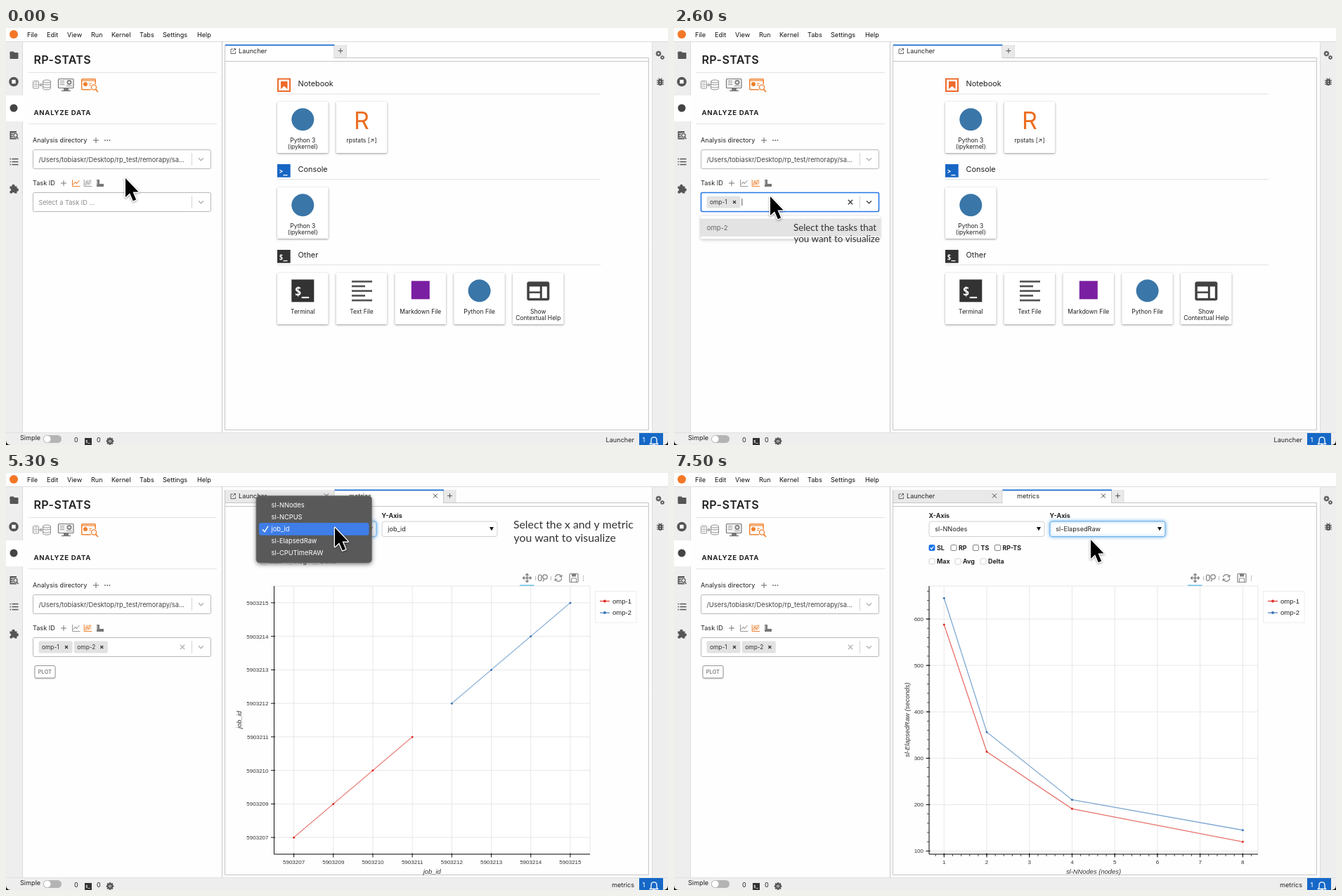
An HTML page with a canvas that plays this animation: 942x594 px, repeating every 7600 ms.

```html
<!DOCTYPE html>
<html lang="en">
<head>
<meta charset="utf-8">
<title>Task metrics walkthrough</title>
<style>
html, body { margin: 0; width: 100%; height: 100%; overflow: hidden; background: #fff; }
canvas { display: block; width: 942px; height: 594px; }
</style>
</head>
<body>
<canvas id="stage"></canvas>
<script>
const W = 942, H = 594, LOOP = 7600, STEP = 100;
const canvas = document.getElementById('stage');
const c = canvas.getContext('2d');
const dpr = window.devicePixelRatio || 1;
canvas.width = W * dpr;
canvas.height = H * dpr;

const UI = 'Inter, sans-serif', PLOT = '"Liberation Sans", Arial, sans-serif', NOTE = 'Lato, sans-serif';
const INK = '#222', DARK = '#555', ORANGE = '#f0812f', BLUE = '#1f6fd0', LINE = '#dcdcdc', BAR = '#eeeeee';
const RED = '#dd2c22', STEEL = '#3a75b5';

// drawing helpers
function text(s, x, y, size = 9.15, color = INK, opt = {}) {
  c.font = `${opt.style || ''} ${opt.weight || 400} ${size}px ${opt.font || UI}`;
  c.textAlign = opt.align || 'left';
  c.letterSpacing = (opt.space || 0) + 'px';
  c.fillStyle = color;
  c.fillText(s, x, y);
}
function rect(x, y, w, h, color) { c.fillStyle = color; c.fillRect(x, y, w, h); }
function box(x, y, w, h, r, fill, stroke, lw = 1) {
  c.beginPath();
  c.roundRect(x, y, w, h, r);
  if (fill) { c.fillStyle = fill; c.fill(); }
  if (stroke) { c.strokeStyle = stroke; c.lineWidth = lw; c.stroke(); }
}
function trace(pts) {
  c.beginPath();
  for (let i = 0; i < pts.length; i += 2) c.lineTo(pts[i], pts[i + 1]);
}
function line(pts, color, lw = 1) { trace(pts); c.strokeStyle = color; c.lineWidth = lw; c.stroke(); }
function poly(pts, color) { trace(pts); c.fillStyle = color; c.fill(); }
function disc(x, y, r, fill) { c.beginPath(); c.arc(x, y, r, 0, 7); c.fillStyle = fill; c.fill(); }
function ring(x, y, r, color, lw = 1) { c.beginPath(); c.arc(x, y, r, 0, 7); c.strokeStyle = color; c.lineWidth = lw; c.stroke(); }
function plus(x, y, r, color, lw = 1) { line([x - r, y, x + r, y], color, lw); line([x, y - r, x, y + r], color, lw); }
function cross(x, y, r, color, lw = 1) {
  line([x - r, y - r, x + r, y + r], color, lw);
  line([x - r, y + r, x + r, y - r], color, lw);
}
function chevron(x, y, color) { line([x - 3.5, y - 1.8, x, y + 1.8, x + 3.5, y - 1.8], color, 1.3); }
function shaded(draw, blur, color, dy = 1) {
  c.save();
  c.shadowBlur = blur * dpr;
  c.shadowColor = color;
  c.shadowOffsetY = dy * dpr;
  draw();
  c.restore();
}

// timeline
const AT = { multi: 1600, open1: 1900, pick1: 2200, open2: 2500, pick2: 2900, plot: 3800, openX: 4700, pickX: 5600, openY: 5900, pickY: 6500 };
const PATH = [
  [0, 170, 214], [300, 170, 214], [800, 115, 222], [1600, 115, 222], [1900, 137, 242],
  [1950, 137, 242], [2150, 130, 283], [2250, 130, 283], [2450, 137, 240], [2700, 137, 240],
  [2850, 130, 283], [2950, 130, 283], [3300, 52, 279], [3850, 52, 279], [4600, 468, 78],
  [5300, 468, 78], [5450, 468, 46], [5600, 468, 46], [5850, 590, 79], [6100, 590, 79],
  [6350, 593, 95], [LOOP, 593, 95]
];
function pointer(t) {
  let i = 1;
  while (PATH[i][0] < t) i++;
  const [t0, x0, y0] = PATH[i - 1], [t1, x1, y1] = PATH[i];
  const u = (t - t0) / (t1 - t0), e = u * u * (3 - 2 * u);
  return { x: x0 + (x1 - x0) * e, y: y0 + (y1 - y0) * e };
}
const over = (p, x, y, w, h) => p.x >= x && p.x <= x + w && p.y >= y && p.y <= y + h;
const during = (t, a, b) => t >= a && t < b;

// small icons
function chartIcon(x, y, color, twin, s = 1) {
  c.save();
  c.translate(x, y);
  c.scale(s, s);
  line([-5, -5, -5, 4.5, 6, 4.5], color, 1);
  line([-4, 2, -1, -1.5, 1, 0.5, 5, -4], color, 1.1);
  if (twin) line([-3, -1, -1, -4, 1, -2.5, 4, -5], color, 0.9);
  if (twin) line([-3, 3, 0, 1, 2, 2, 5.5, -1], color, 0.9);
  c.restore();
}
function terminal(x, y, size, color, sign) {
  rect(x, y, size, size, color);
  text(sign, x + size * 0.13, y + size * 0.74, size * 0.54, '#fff', { weight: 600, font: '"Noto Sans Mono", monospace' });
}
function launchMark(x, y) {
  line([x, y - 3, x - 3, y - 3, x - 3, y + 3.5, x + 3.5, y + 3.5, x + 3.5, y + 0.5], DARK, 0.9);
  line([x - 0.5, y + 0.5, x + 3.5, y - 3.5], DARK, 0.9);
  line([x + 1, y - 3.5, x + 3.5, y - 3.5, x + 3.5, y - 1], DARK, 0.9);
}
function gear(x, y, r, hole) {
  c.save();
  c.translate(x, y);
  for (let i = 0; i < 4; i++) { rect(-r * 1.3, -r * 0.3, r * 2.6, r * 0.6, DARK); c.rotate(Math.PI / 4); }
  disc(0, 0, r, DARK);
  disc(0, 0, r * 0.45, hole);
  c.restore();
}
function bell(x, y) {
  c.beginPath();
  c.moveTo(x - 5.5, y + 4);
  c.lineTo(x - 4, y + 2);
  c.lineTo(x - 4, y - 1.5);
  c.bezierCurveTo(x - 4, y - 7, x + 4, y - 7, x + 4, y - 1.5);
  c.lineTo(x + 4, y + 2);
  c.lineTo(x + 5.5, y + 4);
  c.closePath();
  c.strokeStyle = '#fff';
  c.lineWidth = 1.3;
  c.stroke();
  disc(x, y + 6, 1.4, '#fff');
}

function frameBars(t) {
  rect(0, 0, W, H, '#fefefe');
  rect(0, 19, 24, 558, BAR);
  rect(919, 19, 23, 558, BAR);
  rect(0, 96, 24, 37, '#fff');
  line([0, 19.5, W, 19.5], LINE);
  line([23.5, 19, 23.5, 96], LINE);
  line([23.5, 133, 23.5, 576], LINE);
  line([919.5, 19, 919.5, 576], LINE);
  line([307.5, 19, 307.5, 576], '#c8c8c8');
  disc(11, 9, 6, '#f37726');
  [['File', 30], ['Edit', 58], ['View', 87], ['Run', 121], ['Kernel', 150], ['Tabs', 190], ['Settings', 223], ['Help', 272]]
    .forEach(([s, x]) => text(s, x, 12.7, 9.15, '#111'));

  // left rail
  box(5.5, 35, 12, 9, 1, DARK);
  box(5.5, 33.5, 6, 4, 1, DARK);
  disc(11, 76.5, 6.8, DARK);
  rect(8.3, 73.8, 5.4, 5.4, '#fff');
  disc(11, 114, 5.5, '#444');
  rect(5.5, 147, 9.5, 11.5, DARK);
  [150, 153, 156].forEach(y => line([7, y, 11, y], '#fff', 1));
  disc(13.5, 153, 4, BAR);
  ring(13.5, 153, 2.6, DARK, 1.2);
  line([15, 155, 17.5, 158], DARK, 1.4);
  [186.5, 190.5, 194.5].forEach(y => { rect(5.5, y - 0.7, 1.6, 1.5, DARK); rect(8.5, y - 0.7, 9, 1.5, DARK); });
  rect(5.5, 225.5, 10, 10, DARK);
  disc(10.5, 225, 2.2, DARK);
  disc(15.8, 230.5, 2.2, DARK);
  disc(5.5, 230.5, 1.7, BAR);
  disc(10.5, 235.7, 1.7, BAR);

  // right rail
  gear(928.5, 36.5, 3, BAR);
  gear(934, 42, 2.3, BAR);
  box(928, 72.5, 6, 9.5, 3, DARK);
  [74.5, 77.2, 80].forEach(y => line([926, y, 936, y], DARK, 1.2));
  line([928.5, 71, 930, 73], DARK);
  line([933.5, 71, 932, 73], DARK);
  line([930, 76, 932, 76], BAR);
  line([930, 79, 932, 79], BAR);

  // status bar
  rect(0, 576, W, 18, BAR);
  line([0, 576.5, W, 576.5], '#e0e0e0');
  text('Simple', 20, 586.7);
  box(53, 580, 26, 11, 5.5, '#b4b4b4');
  disc(58.7, 585.5, 4.8, '#fff');
  text('0', 97, 590);
  terminal(112, 584, 10, '#333', '$_');
  text('0', 129, 590);
  gear(148, 588.5, 4.1, BAR);
  disc(148, 588.5, 1, DARK);
  text(t < AT.plot ? 'Launcher' : 'metrics', 894, 590, 9.15, INK, { align: 'right' });
  rect(901, 577, 34, 17, '#1668c7');
  text('1', 905.5, 590, 9.5, '#fff');
  bell(922, 588.5);
}

function selectBox(y, focus, hot) {
  box(38.5, y + 0.5, 253, 27, 2, '#fff', focus ? '#2577e8' : '#b8b8b8', focus ? 1.6 : 1);
  line([264.5, y + 5, 264.5, y + 23], '#d4d4d4');
  chevron(277.5, y + 14, hot ? '#444' : '#b0b0b0');
}
function pill(s, x) {
  box(x, 239.5, 48, 17, 2, '#e2e2e2');
  text(s, x + 4.5, 251, 8.4, '#333');
  cross(x + 39.5, 248, 2, '#333', 1.1);
}

function sidePanel(t, p) {
  text('RP-STATS', 39.5, 51, 16.1, '#222', { weight: 600, space: 0.35 });
  line([32, 63.5, 300, 63.5], '#e2e2e2');
  line([32, 136.5, 300, 136.5], '#e2e2e2');
  text('ANALYZE DATA', 39.5, 123.7, 9.6, '#222', { weight: 700, space: 0.7 });

  // workflow icons
  const g = '#929292';
  box(38.5, 75.5, 8, 10.5, 1, null, g);
  [78, 80.5, 83].forEach(y => line([40, y, 45, y], g, 0.8));
  line([46, 81, 51, 81], g, 1.2);
  line([49, 79, 51, 81, 49, 83], g, 1.2);
  c.beginPath();
  c.ellipse(58, 76, 5.5, 2, 0, 0, 7);
  [80, 84, 87].forEach(y => { c.moveTo(63.5, y - 1); c.ellipse(58, y - 1, 5.5, 2, 0, 0, Math.PI); });
  c.moveTo(52.5, 76); c.lineTo(52.5, 86);
  c.moveTo(63.5, 76); c.lineTo(63.5, 86);
  c.strokeStyle = g;
  c.lineWidth = 1;
  c.stroke();
  box(74.5, 72.5, 21.5, 13, 1, '#f3f3f3', '#777', 1.2);
  [75.5, 78, 80.5].forEach(y => line([77, y, 83, y], g, 0.9));
  ring(90, 77.5, 2.6, '#777', 1.6);
  line([86, 82.5, 94, 82.5], g, 0.9);
  rect(82, 86, 7, 3, '#777');
  line([79, 89.5, 92, 89.5], '#777', 1.3);
  box(107.7, 72.7, 19.5, 15, 1, '#fff', ORANGE, 1.5);
  line([107, 75, 128, 75], ORANGE, 1.2);
  disc(113, 80, 3, ORANGE);
  [79, 81.5].forEach(y => line([118, y, 122, y], ORANGE));
  disc(125, 84.5, 5.3, '#fff');
  ring(125, 84.5, 3.6, ORANGE, 1.4);
  line([127.5, 87.3, 131, 91], ORANGE, 1.8);

  text('Analysis directory', 38, 163.2);
  plus(128, 160, 4, '#666');
  [141, 144.2, 147.4].forEach(x => disc(x, 160, 0.9, '#666'));
  selectBox(173, false, false);
  text('/Users/tobiaskr/Desktop/rp_test/remorapy/sa...', 46.5, 190.7, 9.35, '#444');

  // task row
  const multi = t >= AT.multi, hover = over(p, 109, 214, 14, 13);
  text('Task ID', 38, 224.3);
  plus(82, 221, 4, '#777');
  chartIcon(99.5, 221, multi ? '#999' : ORANGE, false);
  chartIcon(116.2, 221, multi || hover ? ORANGE : '#999', true);
  poly([129, 216, 133, 216, 133, 222, 139, 222, 139, 226, 129, 226], '#777');
  [218, 220, 222].forEach(y => line([129, y, 130.8, y], '#fff', 0.7));

  const menu = during(t, AT.open1, AT.pick1) || during(t, AT.open2, AT.pick2);
  const active = during(t, AT.open1, AT.plot);
  const tasks = (t >= AT.pick1) + (t >= AT.pick2);
  selectBox(234, menu, active);
  if (tasks > 0) {
    pill('omp-1', 46.5);
    if (tasks > 1) pill('omp-2', 96.8);
    cross(251, 248, 3.2, active ? '#444' : '#b8b8b8', 1.5);
  } else if (!active) text('Select a Task ID ...', 46.5, 251.5, 9.2, '#8c8c8c');
  if (active) line([46.5 + 50.3 * tasks, 243, 46.5 + 50.3 * tasks, 253], '#444', 0.9);
  if (tasks > 1) {
    const hot = over(p, 40, 273, 30, 20);
    shaded(() => box(41, 274.5, 29, 17.5, 2, '#fff'), 2, '#aaa');
    box(41, 274.5, 29, 17.5, 2, '#fff', hot ? '#f4a66c' : '#999', 1);
    text('PLOT', 55.5, 286, 7.4, hot ? ORANGE : '#555', { align: 'center', space: 0.2 });
  }
  if (menu) {
    const list = tasks ? ['omp-2'] : ['omp-1', 'omp-2'];
    const h = 7 + 25.5 * list.length;
    shaded(() => box(38, 268, 255, h, 2, '#fff'), 4, '#bbb');
    const row = Math.min(list.length - 1, Math.max(0, Math.floor((p.y - 271) / 25.5)));
    list.forEach((s, i) => {
      if (i === row) rect(38, 271.5, 255, 25.5, '#e3e3e3');
      text(s, 46.8, 288 + i * 25.5, 9.5, '#666');
    });
  }
}

function card(x, y, label, sub, draw) {
  shaded(() => box(x, y, 72.5, 73, 1.5, '#fff'), 3, '#999');
  draw(x + 36.3, y + 25.3);
  text(label, x + 36.3, y + 57.8, 8.5, INK, { align: 'center' });
  if (sub) text(sub, x + 36.3, y + 67.4, 8.5, INK, { align: 'center' });
}
const blueDot = (x, y) => disc(x, y, 16, '#3a76a8');

function launcher() {
  box(387, 72.5, 17, 17.5, 0, '#fff', '#ee6a2c', 2);
  poly([391, 76, 400.5, 76, 400.5, 87, 395.7, 82.8, 391, 87], '#ee6a2c');
  terminal(386, 194, 18.7, '#1766c4', '>_');
  terminal(386, 316, 18.7, '#333', '$_');
  ['Notebook', 'Console', 'Other'].forEach((s, i) => {
    text(s, 415.5, 83 + i * 122, 10.9);
    line([386, 94 + i * 121.7, 846, 94 + i * 121.7], '#e0e0e0');
  });
  card(386, 105, 'Python 3', '(ipykernel)', blueDot);
  card(469.7, 105, 'rpstats [↗]', '', (x, y) => text('R', x, y + 14, 34, '#ec6e22', { align: 'center' }));
  card(386, 227, 'Python 3', '(ipykernel)', blueDot);
  card(386, 349, 'Terminal', '', (x, y) => terminal(x - 16, y - 16, 32, '#333', '$_'));
  card(469.7, 349, 'Text File', '', (x, y) => {
    for (let i = 0; i < 5; i++) rect(x - 14, y - 14.5 + i * 6.7, i % 2 ? 19 : 29, 2.7, '#555');
  });
  card(553.5, 349, 'Markdown File', '', (x, y) => rect(x - 13, y - 14, 26, 26, '#7b1fa2'));
  card(637.3, 349, 'Python File', '', blueDot);
  card(721, 349, 'Show', 'Contextual Help', (x, y) => {
    box(x - 16, y - 13, 32, 27, 3, '#424242');
    rect(x - 12.5, y - 6, 15, 7, '#fff');
    rect(x - 12.5, y + 3.5, 15, 7, '#fff');
    rect(x + 5.5, y - 6, 7, 16.5, '#fff');
  });
}

function dock(t) {
  const plotted = t >= AT.plot;
  line([311.5, 24, 311.5, 572.5, 914.5, 572.5, 914.5, 42.5, 311.5, 42.5], '#c6c6c6');
  line([312, 47.5, 914, 47.5], '#c6c6c6');
  const tab = (x, w, on) => {
    rect(x, 24, w, 18, on ? '#fff' : '#e9e9e9');
    line([x + w - 0.5, 24, x + w - 0.5, 42], '#c9c9c9');
    if (on) { rect(x, 42, w - 1, 1, '#fff'); rect(x, 23.5, w, 1.8, BLUE); }
  };
  tab(312, 155.5, !plotted);
  launchMark(323, 33);
  text('Launcher', 331, 36.2, 9.1);
  let end = 467.5;
  if (plotted) {
    cross(456, 32.5, 3, '#444');
    tab(467.5, 155.5, true);
    text('metrics', 488, 36.2, 9.1);
    cross(611, 32.5, 3, '#444');
    end = 623;
  }
  rect(end, 24, 17, 18, '#e9e9e9');
  line([end + 17, 24, end + 17, 42], LINE);
  plus(end + 8.5, 32.5, 3.4, '#555');
}

function dropdown(x, label, value, focus) {
  text(label, x, 64.3, 9, INK, { weight: 700 });
  const draw = () => box(x + 0.5, 69, 164, 21.5, 3, '#fff', focus ? '#66afe9' : '#d0d0d0');
  if (focus) shaded(draw, 5, '#66afe9', 0); else draw();
  text(value, x + 8.7, 82.7);
  poly([x + 153.5, 77, x + 159.5, 77, x + 156.5, 82.3], '#111');
}
function check(x, y, label, on, faint) {
  box(x + 0.5, y - 4, 8, 8, 1.5, on ? '#1a73e8' : '#fff', on ? '#1a73e8' : faint ? '#ccc' : '#777', 0.9);
  if (on) line([x + 2.4, y, x + 4, y + 2, x + 6.8, y - 2], '#fff', 1.3);
  text(label, x + 11.5, y + 3.4, 8.9, INK, { weight: 700 });
}

const METRICS = ['sl-NNodes', 'sl-NCPUS', 'job_id', 'sl-ElapsedRaw', 'sl-CPUTimeRAW'];
function popup(x, p) {
  shaded(() => box(x, 32.5, 164.5, 95.5, 5, 'rgba(88,88,88,.97)'), 6, '#777', 2);
  box(x, 32.5, 164.5, 95.5, 5, null, '#777', 0.7);
  const row = Math.min(4, Math.max(0, Math.round((p.y - 79.7) / 17.2) + 2));
  METRICS.forEach((s, i) => {
    const y = 45.3 + i * 17.2;
    if (i === row) box(x + 4, y - 8.6, 156.5, 17.6, 3, '#3f7ee8');
    text(s, x + 21.5, y + 3.2, 9.3, '#fff');
    if (i === 2) line([x + 9, y + 0.5, x + 12, y + 4, x + 17, y - 4], '#fff', 1.4);
  });
}

function plotTools() {
  const g = '#808080';
  plus(741.5, 149.5, 5.5, '#707070', 1.2);
  [[0, -1], [0, 1], [-1, 0], [1, 0]].forEach(([a, b]) => {
    const x = 741.5 + a * 6, y = 149.5 + b * 6;
    line([x - a * 2.2 - b * 2.2, y - b * 2.2 - a * 2.2, x, y, x - a * 2.2 + b * 2.2, y - b * 2.2 + a * 2.2], '#707070', 1.1);
  });
  rect(731, 159.5, 20.5, 1.6, '#26aae1');
  line([753.5, 147, 753.5, 153], '#bbb');
  line([775.5, 147, 775.5, 153], '#bbb');
  box(757.5, 145, 4.5, 8.5, 2.2, null, g, 1.2);
  ring(767, 148, 3.2, g, 1.3);
  line([766, 151, 764, 154.5], g, 1.3);
  c.beginPath();
  c.arc(786, 149.5, 4.8, 3.4, 5.9);
  c.moveTo(790.6, 151);
  c.arc(786, 149.5, 4.8, 0.3, 2.8);
  c.strokeStyle = g;
  c.lineWidth = 1.3;
  c.stroke();
  line([791, 145, 790.6, 148, 787.5, 147.5], g, 1.2);
  line([781, 154, 781.4, 151, 784.5, 151.5], g, 1.2);
  box(802, 143.5, 12, 12, 1, null, g, 1.2);
  rect(805, 143.5, 6, 4, g);
  box(804.5, 150, 7, 5.5, 0, null, g, 0.9);
  [147, 150, 153].forEach(y => disc(821.5, y, 0.8, '#999'));
}

const NODES = [1, 2, 4, 8], IDS = ['07', '09', '10', '11', '12', '13', '14', '15'].map(n => '59032' + n);
const ELAPSED = [[588, 314, 191, 120], [645, 356.5, 210.5, 145]];
const TOP = 161, BOTTOM = 543, RIGHT = 831;

function idAxis(a, b) {
  return { name: 'job_id', pos: i => a + (b - a) * (i + 0.5) / 8, ticks: IDS.map((s, i) => [i, s]), minor: [], data: s => [0, 1, 2, 3].map(i => i + s * 4) };
}
function numAxis(name, first, last, step, p0, unit, lo, hi, data) {
  const pos = v => p0 + (v - first) * unit, ticks = [], minor = [];
  for (let v = first; v <= last; v += step) ticks.push([v, String(v)]);
  for (let k = Math.ceil(lo * 5 / step); k <= hi * 5 / step; k++) minor.push(k * step / 5);
  return { name, pos, ticks, minor, data };
}

function chart(t) {
  const nodes = t >= AT.pickX, timed = t >= AT.pickY;
  const left = timed ? 363 : 381.5;
  const xa = !nodes ? idAxis(left, RIGHT)
    : numAxis('sl-NNodes (nodes)', 1, 8, 1, timed ? 384.3 : 401.5, timed ? 60.72 : 58.36, 0.8, 8.3, () => NODES);
  const ya = timed ? numAxis('sl-ElapsedRaw (seconds)', 100, 600, 100, 538.5, -0.661, 100, 665, s => ELAPSED[s])
    : idAxis(BOTTOM, TOP);
  box(left, TOP, RIGHT - left, BOTTOM - TOP, 0, '#fff', '#e5e5e5');
  xa.ticks.forEach(([v]) => line([xa.pos(v), TOP, xa.pos(v), BOTTOM], '#e5e5e5', 0.9));
  ya.ticks.forEach(([v]) => line([left, ya.pos(v), RIGHT, ya.pos(v)], '#e5e5e5', 0.9));
  line([left, TOP, left, BOTTOM, RIGHT, BOTTOM], '#111');
  const lab = { font: PLOT, align: 'center' };
  xa.minor.forEach(v => line([xa.pos(v), BOTTOM, xa.pos(v), BOTTOM + 3], '#222', 0.8));
  ya.minor.forEach(v => line([left - 3, ya.pos(v), left, ya.pos(v)], '#222', 0.8));
  xa.ticks.forEach(([v, s]) => {
    line([xa.pos(v), BOTTOM - 1.5, xa.pos(v), BOTTOM + 4.5], '#111');
    text(s, xa.pos(v), 556.6, 8, '#333', lab);
  });
  ya.ticks.forEach(([v, s]) => {
    line([left - 4.5, ya.pos(v), left + 1.5, ya.pos(v)], '#111');
    text(s, left - 8, ya.pos(v) + 2.9, 8, '#333', { font: PLOT, align: 'right' });
  });
  const title = { font: PLOT, align: 'center', style: 'italic' };
  text(xa.name, (left + RIGHT) / 2, 571, 9.4, '#333', title);
  c.save();
  c.translate(334.5, 351.5);
  c.rotate(-Math.PI / 2);
  text(ya.name, 0, 0, 9.4, '#333', title);
  c.restore();

  box(838.5, 168.5, 58.5, 44.5, 0, '#fff', '#ececec');
  [RED, STEEL].forEach((color, s) => {
    const xs = xa.data(s).map(xa.pos), ys = ya.data(s).map(ya.pos);
    line(xs.flatMap((x, i) => [x, ys[i]]), s ? '#7fa9d2' : '#e8746d', 1.3);
    xs.forEach((x, i) => disc(x, ys[i], 1.5, color));
    const y = 182.5 + s * 16.6;
    line([845, y, 859, y], color, 1.1);
    disc(852, y, 2, color);
    text('omp-' + (s + 1), 863, y + 3.2, 9.5, '#222', { font: PLOT });
  });
}

function metrics(t, p) {
  const xOpen = during(t, AT.openX, AT.pickX), yOpen = during(t, AT.openY, AT.pickY);
  dropdown(362.5, 'X-Axis', t >= AT.pickX ? METRICS[0] : 'job_id', during(t, AT.openX, AT.openY));
  dropdown(534.5, 'Y-Axis', t >= AT.pickY ? METRICS[3] : 'job_id', t >= AT.openY);
  [['SL', 362.5], ['RP', 393.5], ['TS', 425], ['RP-TS', 456]].forEach(([s, x], i) => check(x, 106.5, s, i === 0));
  [['Max', 362.5], ['Avg', 399.5], ['Delta', 435.5]].forEach(([s, x]) => check(x, 126, s, false, true));
  plotTools();
  chart(t);
  if (xOpen) popup(356, p);
  if (yOpen) popup(527.5, p);
}

function notes(t) {
  const note = (s, x, y, size) => text(s, x, y, size, '#333', { font: NOTE });
  if (during(t, 800, 1800)) {
    note('Select', 151, 216.3, 11.2);
    chartIcon(193, 210.5, '#333', true, 1.4);
    note('to enable', 207, 216.3, 11.2);
    note('multiple-task plot mode', 152, 231.5, 11.1);
  } else if (during(t, 2000, 3000)) {
    note('Select the tasks that', 170, 288.5, 13.3);
    note('you want to visualize', 170.5, 304.5, 13.3);
  } else if (during(t, 3200, AT.plot)) {
    note('Click on the PLOT button to', 119.5, 293, 14.35);
    note('open the plot window', 119.5, 311, 14.35);
  } else if (during(t, 4300, 6800)) {
    note('Select the x and y metric', 722, 79, 15.8);
    note('you want to visualize', 722.5, 98, 15.8);
  }
}

const ARROW = new Path2D('M0 0V25.5L5.8 20L10.2 30.5L14.3 28.8L9.9 18.5H17.5Z');
const HAND = new Path2D('M-3 3Q-3 0 0 0Q3 0 3.2 3L4 9.5Q7 7.5 8.5 10.3Q11.5 8.8 13 11.7Q16.5 10.5 17.5 14.5Q18.2 20 15 25V29.5H1.5V27Q-2 23 -4.5 19Q-8.5 15.5 -7.8 13.8Q-5.5 11.5 -1.2 15.5Z');
function cursor(p) {
  const hand = over(p, 93, 214, 46, 13) || over(p, 40, 273, 30, 20);
  const shape = hand ? HAND : ARROW;
  c.save();
  c.translate(p.x, p.y);
  c.scale(1.06, 1.06);
  c.lineJoin = 'round';
  c.strokeStyle = '#fff';
  c.lineWidth = hand ? 3.6 : 2.6;
  shaded(() => c.stroke(shape), 3, 'rgba(0,0,0,.4)');
  c.fillStyle = hand ? '#fff' : '#000';
  c.fill(shape);
  if (hand) {
    c.strokeStyle = '#000';
    c.lineWidth = 1.9;
    c.stroke(shape);
    [4, 8, 12].forEach(x => line([x, 18, x, 25], '#000', 1.5));
  }
  c.restore();
}

function corners() {
  c.fillStyle = '#111';
  [[0, 1], [W, -1]].forEach(([x, d]) => {
    c.beginPath();
    c.moveTo(x, H);
    c.lineTo(x, H - 7);
    c.quadraticCurveTo(x, H, x + 7 * d, H);
    c.fill();
  });
}

function render(t) {
  c.setTransform(dpr, 0, 0, dpr, 0, 0);
  const p = pointer(t);
  frameBars(t);
  sidePanel(t, p);
  dock(t);
  if (t < AT.plot) launcher(); else metrics(t, p);
  notes(t);
  cursor(p);
  corners();
}

const start = performance.now();
function tick() {
  const t = (performance.now() - start) % LOOP;
  render(Math.floor(t / STEP) * STEP);
  requestAnimationFrame(tick);
}
tick();
</script>
</body>
</html>
```
